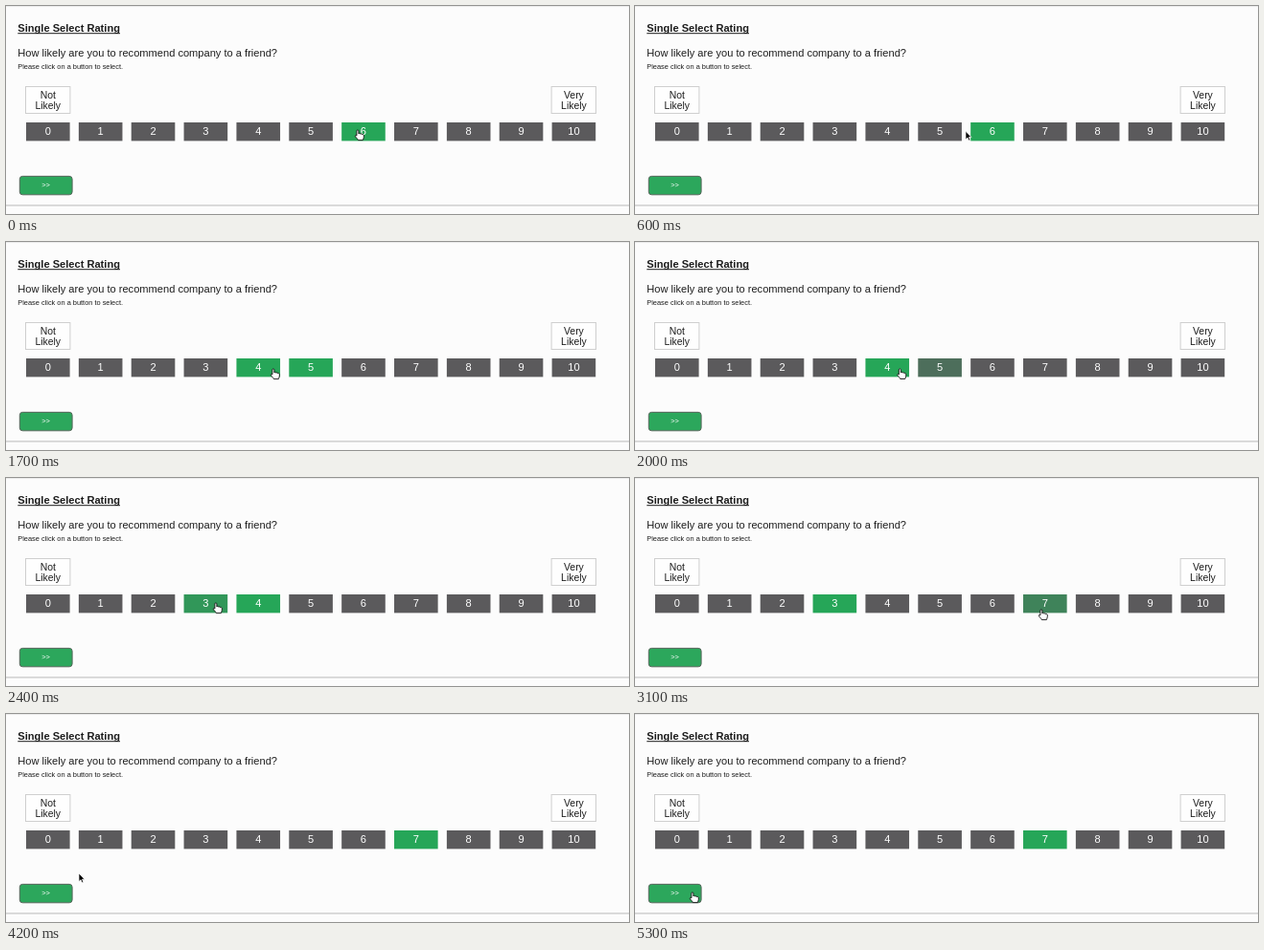
An HTML page for the animation above (5.4 s loop, 650 px wide and 218 px high).

```html
<!DOCTYPE html>
<html lang="en">
<head>
<meta charset="utf-8">
<title>Single Select Rating</title>
<style>
  html, body { margin: 0; width: 100%; height: 100%; overflow: hidden; background: #fff; }
  svg { display: block; width: 650px; height: 218px; font: 11.1px "Liberation Sans", Arial, sans-serif; fill: #1c1c1c; }
  .mid { text-anchor: middle; }
  .light { fill: #fff; }
  .label { font-size: 10.4px; }
  .small { font-size: 7.4px; }
</style>
</head>
<body>
<svg viewBox="0 0 650 218">
  <rect width="650" height="218" fill="#fcfcfc"/>
  <rect width="650" height="1" fill="#ececec"/>
  <rect y="208.4" width="650" height="1.2" fill="#c6c6c6"/>
  <text x="12.3" y="27" font-weight="bold">Single Select Rating</text>
  <rect x="12.3" y="28.2" width="106.7" height="1" fill="#1c1c1c"/>
  <text x="12.3" y="53">How likely are you to recommend company to a friend?</text>
  <text x="12.3" y="65.6" class="small">Please click on a button to select.</text>
  <g id="labels"></g>
  <g id="scale"></g>
  <rect x="14.3" y="178.4" width="54.8" height="19.4" rx="3" fill="#2ca75c" stroke="#56655b"/>
  <text x="41.5" y="190.3" class="mid light small">&gt;&gt;</text>
  <g id="cursor" stroke-linejoin="round">
    <path id="hand" fill="#fff" stroke="#111" stroke-width=".9" d="M-1.1 .9C-1.1-.4 .9-.4 .9 .9V4C1.3 3.2 2.7 3.4 2.8 4.2C3.4 3.6 4.6 3.9 4.6 4.7C5.3 4.3 6.3 4.6 6.3 5.6V7.6C6.3 8.8 5.4 9.6 5.4 10.6H.3C.2 9.4-1.6 8.4-2.6 6.6C-3.1 5.6-2 5.1-1.1 6Z"/>
    <path id="arrow" fill="#000" stroke="#fff" stroke-width=".7" d="M0 0V8.6L2 6.8L3.3 9.8L4.8 9.2L3.5 6.2H6Z"/>
  </g>
</svg>
<script>
const LOOP = 5400, STEP = 100, FADE = 300;
const GREY = [91, 90, 92], GREEN = [38, 166, 88];
const BTN = { x: 21, y: 122, w: 45.6, h: 19.4, gap: 54.86 };
const $ = id => document.getElementById(id);
const clamp = v => Math.min(1, Math.max(0, v));

// When each rating lights up and goes out again
const lit = { 6: [-FADE, 960], 5: [620, 1780], 4: [1390, 2480], 3: [2160, 3300], 7: [2940, LOOP + FADE] };

// Pointer tip: time, x, y
const path = [
  [300, 367, 130], [800, 333, 132], [1220, 333, 132], [1600, 279, 133],
  [1950, 279, 133], [2350, 219, 131], [2560, 219, 131], [2720, 250, 149],
  [2930, 412, 142], [3100, 424, 138], [3400, 426, 134], [3850, 426, 134],
  [4200, 76, 167], [4600, 60, 187]
];

function add(parent, tag, attrs, text = "") {
  const el = document.createElementNS("http://www.w3.org/2000/svg", tag);
  for (const key in attrs) el.setAttribute(key, attrs[key]);
  el.textContent = text;
  return parent.appendChild(el);
}

const left = n => BTN.x + n * BTN.gap;

const buttons = Array.from({ length: 11 }, (_, n) => {
  const rect = add($("scale"), "rect", { x: left(n), y: BTN.y, width: BTN.w, height: BTN.h });
  add($("scale"), "text", { x: left(n) + BTN.w / 2, y: 135.4, class: "mid light" }, n);
  return rect;
});

for (const [n, word] of [[0, "Not"], [10, "Very"]]) {
  const x = left(n), mid = x + BTN.w / 2;
  add($("labels"), "rect", { x: x - .5, y: 84.5, width: 46.4, height: 28, fill: "#fefefe", stroke: "#cfcfcf" });
  add($("labels"), "text", { x: mid, y: 97, class: "mid label" }, word);
  add($("labels"), "text", { x: mid, y: 107.5, class: "mid label" }, "Likely");
}

function pointer(t) {
  const next = path.findIndex(p => p[0] > t);
  if (next === 0) return path[0].slice(1);
  if (next < 0) return path[path.length - 1].slice(1);
  const [t0, x0, y0] = path[next - 1], [t1, x1, y1] = path[next];
  const k = (t - t0) / (t1 - t0), e = k * k * (3 - 2 * k);
  return [x0 + (x1 - x0) * e, y0 + (y1 - y0) * e];
}

function clickable(x, y) {
  const dx = x - BTN.x;
  const onScale = dx >= 0 && dx % BTN.gap < BTN.w && y > BTN.y && y < BTN.y + BTN.h;
  return onScale || (x > 14 && x < 69 && y > 178 && y < 198);
}

function glow(n, t) {
  if (!lit[n]) return 0;
  const [on, off] = lit[n];
  return Math.min(clamp((t - on) / FADE), 1 - clamp((t - off) / FADE));
}

function draw(t) {
  buttons.forEach((rect, n) => {
    const k = glow(n, t);
    rect.setAttribute("fill", `rgb(${GREY.map((c, i) => Math.round(c + (GREEN[i] - c) * k))})`);
  });
  const [x, y] = pointer(t), hand = clickable(x, y);
  $("cursor").setAttribute("transform", `translate(${x} ${y})`);
  $("hand").style.display = hand ? "" : "none";
  $("arrow").style.display = hand ? "none" : "";
}

const start = performance.now();
function tick() {
  const t = (performance.now() - start) % LOOP;
  draw(Math.floor(t / STEP) * STEP);
  requestAnimationFrame(tick);
}
tick();
</script>
</body>
</html>
```
